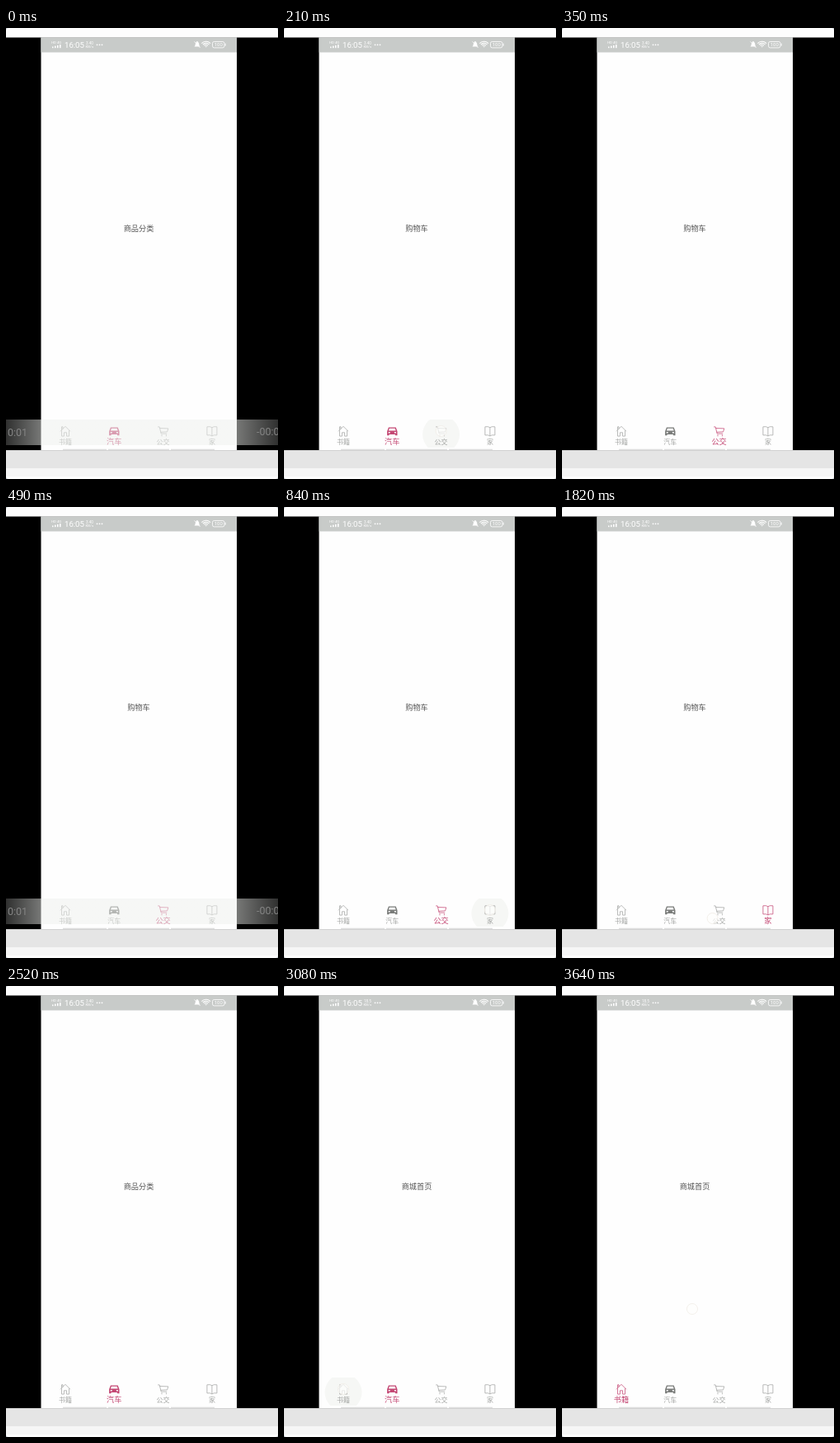
Write an HTML page with a canvas that moves like this. It is 330 px wide and 546 px high and loops after 3780 ms.

```html
<!DOCTYPE html>
<html lang="zh-CN">
<head>
<meta charset="utf-8">
<style>
  html, body { margin: 0; width: 100%; height: 100%; overflow: hidden; background: #fff; }
  canvas { display: block; width: 330px; height: 546px; }
</style>
</head>
<body>
<canvas id="stage"></canvas>
<script>
const W = 330, H = 546, LOOP = 3780, STEP = 70;
const phone = { left: 42.5, right: 280, top: 11.5, bottom: 511, tabTop: 474 };
phone.width = phone.right - phone.left;

const canvas = document.getElementById('stage');
const dpr = window.devicePixelRatio || 1;
canvas.width = W * dpr;
canvas.height = H * dpr;
const ctx = canvas.getContext('2d');
ctx.scale(dpr, dpr);

const CJK = '"Noto Sans CJK SC", "Noto Sans CJK", sans-serif';
const LATIN = 'Roboto, sans-serif';
const PINK = '#c44874', GREY = '#a3a5a3', CAR_GREY = '#7b7d7b';

// Icons are centred on the origin.
const icons = {
  house: new Path2D('M-6 0L0-6 6 0M-4.5-1V5.8H-1.6V1.5H1.6V5.8H4.5V-1M-4.5-1.5V-5.5H-3V-3'),
  car: new Path2D('M-6.2 0L-4.4-4.8H4.4L6.2 0V5H3.7V3.7H-3.7V5H-6.2ZM-4.4-.7H4.4L3.4-3.6H-3.4Z' +
    'M-4.6 .8H-2.6V2.2H-4.6ZM2.6 .8H4.6V2.2H2.6Z'),
  cart: new Path2D('M-6.4-5.4H-4.4L-2.4 2.8H4.6M-4-3.8L6.2-3.4 5 .6-2.9 1M-1.6 4v2M3.8 4v2'),
  book: new Path2D('M0-4.6Q2-6.2 6-5.5V4.6Q2 4 0 5.6ZQ-2-6.2-6-5.5V4.6Q-2 4 0 5.6'),
};
const bell = new Path2D('M-3.5 2.5Q-2 1.5-2.2-1 0-7 2.2-1 2 1.5 3.5 2.5Z');

const tabs = [
  { label: '书籍', page: '商城首页', icon: icons.house },
  { label: '汽车', page: '商品分类', icon: icons.car, solid: true },
  { label: '公交', page: '购物车', icon: icons.cart },
  { label: '家', page: '个人中心', icon: icons.book },
];
tabs.forEach((tab, i) => { tab.x = 72 + i * 59.3; });

// Each tap swaps the page first, then highlights its tab.
const PAGE_DELAY = 70, TAB_DELAY = 210, TOUCH_TIME = 210;
const FIRST_TAB = 1;
const taps = [
  { at: 70, tab: 2 },
  { at: 840, tab: 3 },
  { at: 1750, tab: 2, dx: -8, dy: 10, quiet: true },
  { at: 2310, tab: 1 },
  { at: 2940, tab: 0 },
];

function tabAfter(t, delay) {
  const done = taps.filter(tap => tap.at + delay <= t);
  return done.length ? done[done.length - 1].tab : FIRST_TAB;
}

function rect(x, y, w, h, color) {
  ctx.fillStyle = color;
  ctx.fillRect(x, y, w, h);
}

function text(str, x, y, size, color, family = CJK, align = 'center') {
  ctx.font = `${size}px ${family}`;
  ctx.textAlign = align;
  ctx.fillStyle = color;
  ctx.fillText(str, x, y);
}

function circle(x, y, r, fill, stroke) {
  ctx.beginPath();
  ctx.arc(x, y, r, 0, Math.PI * 2);
  ctx.fillStyle = fill;
  ctx.fill();
  if (!stroke) return;
  ctx.strokeStyle = stroke;
  ctx.lineWidth = 0.8;
  ctx.stroke();
}

function drawShape(path, x, y, color, solid) {
  ctx.save();
  ctx.translate(x, y);
  ctx.fillStyle = ctx.strokeStyle = color;
  ctx.lineWidth = 0.75;
  solid ? ctx.fill(path, 'evenodd') : ctx.stroke(path);
  ctx.restore();
}

function drawBackdrop() {
  rect(0, 0, W, H, '#b5bcc4');
  ctx.beginPath();
  ctx.roundRect(0, 0, W, H, 3);
  ctx.fillStyle = '#fdfdfd';
  ctx.fill();
  rect(0, phone.top, W, phone.bottom - phone.top, '#000');
  rect(0, phone.bottom, W, 22, '#e5e5e5');
  rect(0, phone.bottom, W, 1, '#d2d2d2');
  rect(0, 533, W, 10, '#f6f6f6');
  rect(phone.left, phone.top, phone.width, phone.bottom - phone.top, '#fefefe');
  for (const [from, to] of [[69, 122], [124, 198], [200, 253]]) {
    rect(from, phone.bottom - 1.3, to - from, 1.3, '#dedede');
  }
}

function drawStatusBar(rate) {
  const white = '#fff';
  rect(phone.left, phone.top, phone.width, 18, '#c8cbc9');
  text('HD 4G', 55, 18.6, 4.3, white, LATIN, 'left');
  for (let i = 0; i < 4; i++) {
    const height = 1.7 + i * 0.8;
    rect(56 + i * 3, 24.2 - height, 1.5, height, white);
    if (i) circle(107.5 + i * 3, 20.3, 0.9, white);
  }
  text('16:05', 71, 24.2, 9.6, white, LATIN, 'left');
  text(rate, 101.4, 19.6, 4.6, white, LATIN);
  text('KB/s', 101.4, 24.4, 4.4, white, LATIN);

  drawShape(bell, 232, 20, white, true);
  drawShape(new Path2D('M-3.5-3.6L3.6 4'), 232, 20, white);
  ctx.strokeStyle = white;
  for (let r = 1; r < 8; r += 2.1) {
    ctx.beginPath();
    ctx.arc(242.7, 23.6, r, -Math.PI * 0.76, -Math.PI * 0.24);
    ctx.lineWidth = 1.1;
    ctx.stroke();
  }
  ctx.beginPath();
  ctx.roundRect(250.5, 16.5, 14.4, 7.4, 2);
  ctx.lineWidth = 0.8;
  ctx.stroke();
  rect(265.6, 18.7, 1, 3, white);
  text('100', 257.7, 22.4, 6, white, LATIN);
}

function drawTabs(t) {
  const current = tabAfter(t, TAB_DELAY);
  const touch = taps.find(tap => t >= tap.at && t < tap.at + TOUCH_TIME);
  if (touch && !touch.quiet) {
    ctx.save();
    ctx.beginPath();
    ctx.rect(phone.left, phone.tabTop, phone.width, 34);
    ctx.clip();
    circle(tabs[touch.tab].x, 492, 22.5, '#f6f7f5');
    ctx.restore();
  }
  tabs.forEach(({ x, label, icon, solid }, i) => {
    const on = i === current;
    const color = on ? PINK : GREY;
    drawShape(icon, x, 488.3, solid && !on ? CAR_GREY : color, solid);
    text(label, x, 504, on ? 9.2 : 8, color);
  });
  if (touch && (!touch.quiet || t > touch.at)) {
    const { tab, dx = 0, dy = 0 } = touch;
    drawTouch(tabs[tab].x + dx, 488 + dy);
  }
}

function drawTouch(x, y) {
  circle(x, y, 6.5, 'rgba(253,253,252,0.7)', '#f0ede6');
}

// Translucent player bar, densest near the phone.
function drawPlayerBar() {
  const veil = ctx.createLinearGradient(0, 0, W, 0);
  const shade = alpha => `rgba(238,240,237,${alpha})`;
  veil.addColorStop(0, shade(0.2));
  veil.addColorStop(phone.left / W, shade(0.5));
  veil.addColorStop(phone.right / W, shade(0.5));
  veil.addColorStop(1, shade(0.2));
  rect(0, phone.tabTop, W, 31, veil);
  text('0:01', 26, 493.7, 12.5, '#858585', LATIN, 'right');
  text('-00:01', 304, 493.3, 12.5, '#858585', LATIN, 'left');
}

function draw(t) {
  const lastTap = taps[taps.length - 1].at;
  drawBackdrop();
  drawStatusBar(t < lastTap ? '3.40' : '18.5');
  text(tabs[tabAfter(t, PAGE_DELAY)].page, 161, 246.3, 9.2, '#565656');
  drawTabs(t);
  if (t >= lastTap + TOUCH_TIME) drawTouch(158, 391);
  if (t < 140 || (t >= 420 && t < 630)) drawPlayerBar();
}

const began = performance.now();
function tick() {
  const t = (performance.now() - began) % LOOP;
  draw(Math.floor(t / STEP) * STEP);
  requestAnimationFrame(tick);
}
tick();
</script>
</body>
</html>
```
